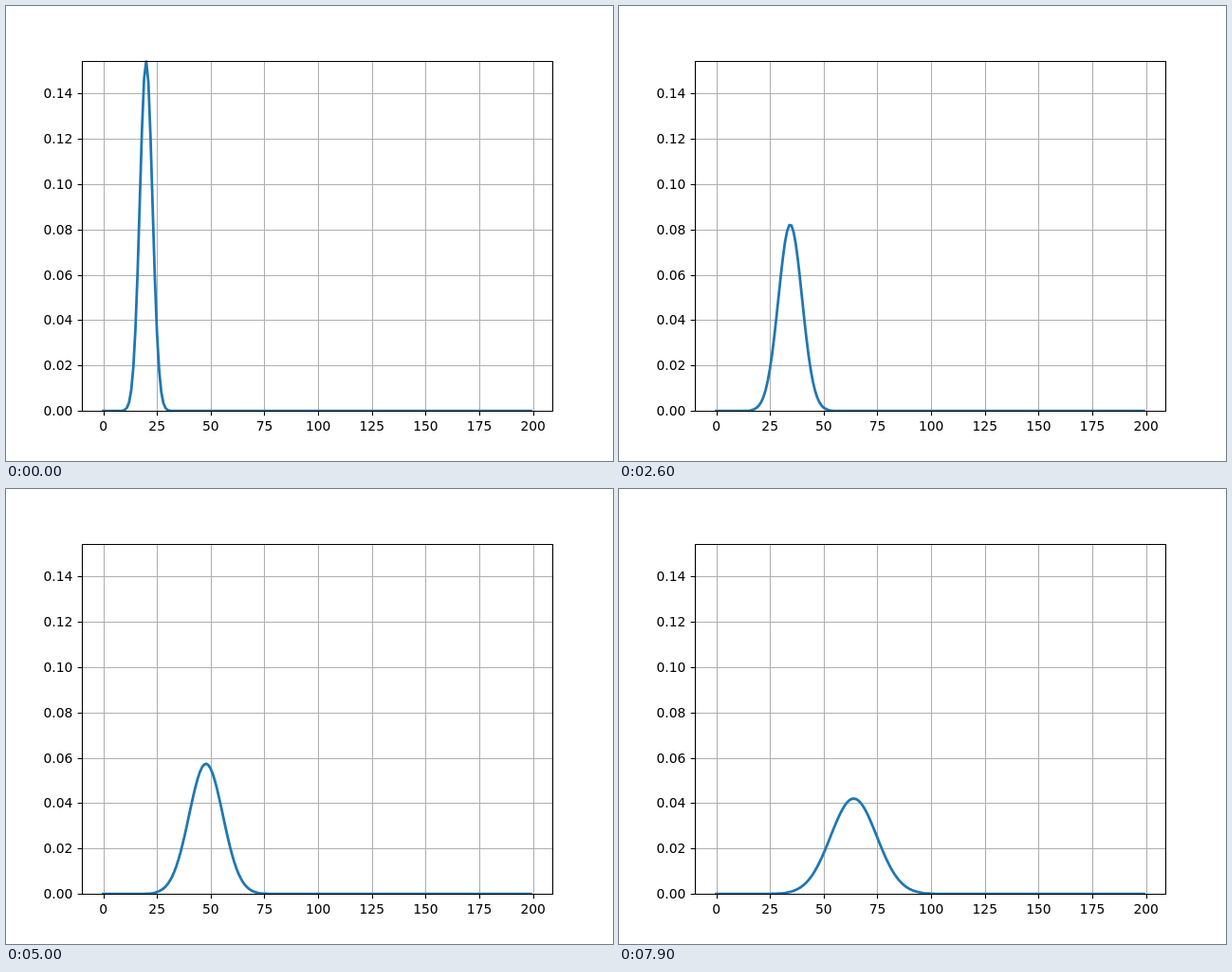
An HTML page for the animation above (8 s loop, 640 px wide and 480 px high).

```html
<!DOCTYPE html>
<html lang="en">
<head>
<meta charset="utf-8">
<title>Spreading pulse</title>
<style>
  html, body { margin: 0; width: 100%; height: 100%; overflow: hidden; background: #fff; }
  svg { display: block; }
  text { font: 13.89px "DejaVu Sans", sans-serif; }
  path { fill: none; stroke: #000; stroke-width: 1.11; }
  #grid { stroke: #b0b0b0; }
  #curve { stroke: #1f77b4; stroke-width: 2.78; stroke-linejoin: round; stroke-linecap: square; }
</style>
</head>
<body>
<svg width="640" height="480" viewBox="0 0 640 480">
  <clipPath id="plot"><rect x="80" y="57.6" width="496" height="369.6"/></clipPath>
  <path id="grid"/>
  <path id="ticks"/>
  <path id="curve" clip-path="url(#plot)"/>
  <path d="M80.5 58.5H576.5V427.5H80.5Z"/>
  <g id="labels"></g>
</svg>
<script>
const STEP = 100, STEPS = 80, POINTS = 200;
const $ = id => document.getElementById(id);
const toX = v => 80 + (v + 9.95) * 496 / 218.9;
const toY = v => 427.2 - v * 2395;
const snap = v => Math.round(v) + 0.5;

function label(text, x, y, anchor) {
  const el = document.createElementNS('http://www.w3.org/2000/svg', 'text');
  el.setAttribute('x', x);
  el.setAttribute('y', y);
  el.setAttribute('text-anchor', anchor);
  el.textContent = text;
  $('labels').append(el);
}

function drawAxes() {
  let grid = '', ticks = '';
  for (let v = 0; v <= 200; v += 25) {
    const x = snap(toX(v));
    grid += `M${x} 58V427`;
    ticks += `M${x} 427.5v4.86`;
    label(v, toX(v), 448, 'middle');
  }
  for (let i = 0; i < 8; i++) {
    const y = snap(toY(i * 0.02));
    grid += `M80 ${y}H576`;
    ticks += `M80.5 ${y}h-4.86`;
    label((i * 0.02).toFixed(2), 70.3, y + 4.5, 'end');
  }
  $('grid').setAttribute('d', grid);
  $('ticks').setAttribute('d', ticks);
}

// Bell curve whose centre and width both grow linearly with each step
function curvePath(n) {
  const mean = 19.95 + 0.557 * n;
  const peak = 1 / (6.48 + 0.2193 * n);
  const sigma = 0.45 / peak;
  const points = Array.from({ length: POINTS }, (_, i) => {
    const y = peak * Math.exp(-(((i - mean) / sigma) ** 2) / 2);
    return toX(i).toFixed(2) + ' ' + toY(y).toFixed(3);
  });
  return 'M' + points.join('L');
}

let start, shown = -1;
function frame(now) {
  start ??= now;
  const n = Math.floor((now - start) / STEP) % STEPS;
  if (n !== shown) $('curve').setAttribute('d', curvePath(shown = n));
  requestAnimationFrame(frame);
}

drawAxes();
$('curve').setAttribute('d', curvePath(0));
requestAnimationFrame(frame);
</script>
</body>
</html>
```
